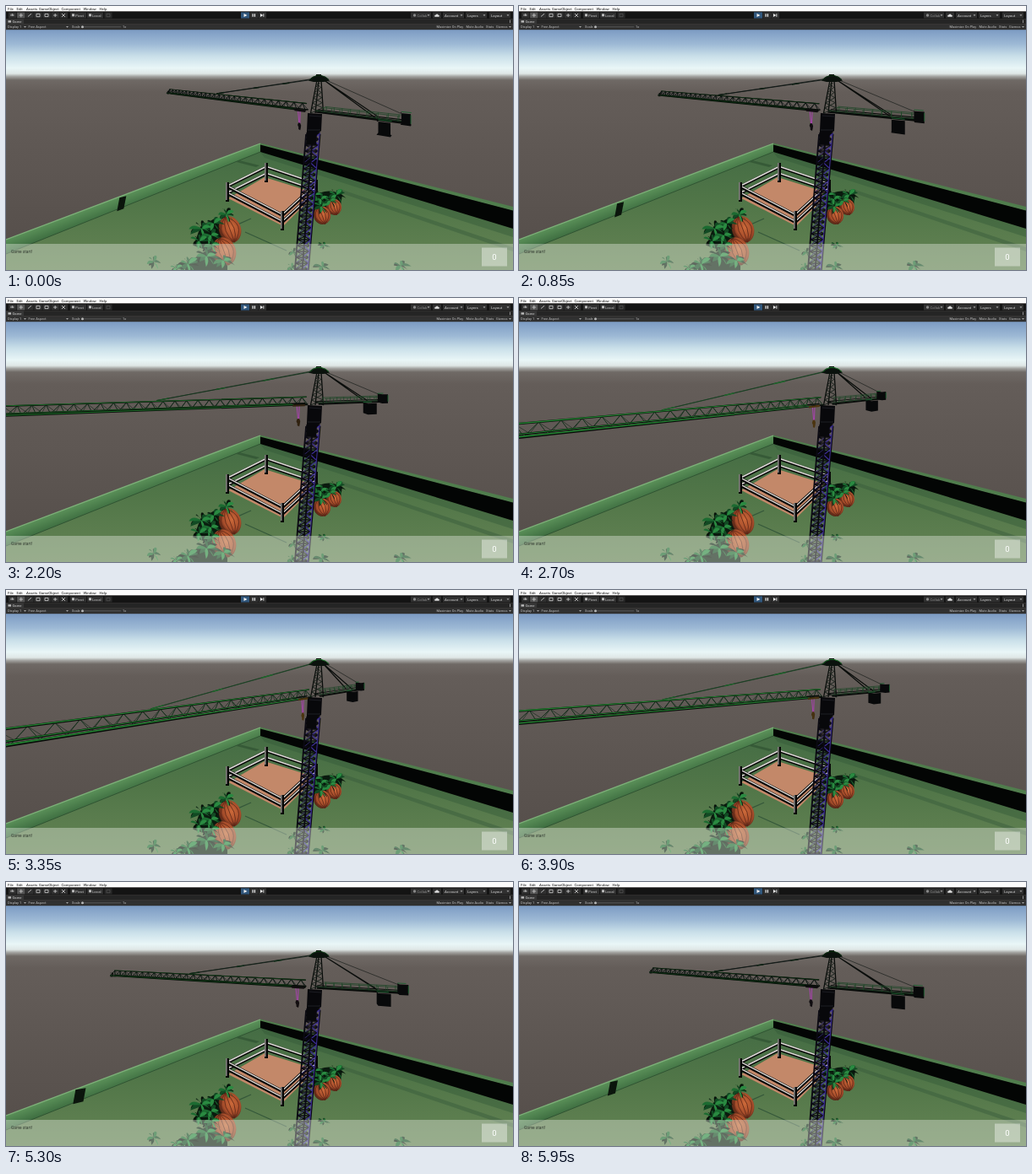
These frames come from a looping animation (600 px wide and 313 px high, 6 s). An HTML page:

```html
<!DOCTYPE html>
<html lang="en">
<head>
<meta charset="utf-8">
<title>Crane game</title>
<style>
html, body { margin: 0; width: 100%; height: 100%; overflow: hidden; background: #5a534f; }
svg { display: block; width: 100vw; height: 100vh; font-family: Roboto, "Liberation Sans", sans-serif; }
</style>
</head>
<body>
<svg id="stage" viewBox="0 0 600 313" preserveAspectRatio="none">
  <defs>
    <linearGradient id="sky" x1="0" y1="28" x2="0" y2="313" gradientUnits="userSpaceOnUse">
      <stop offset="0" stop-color="#7c9bc3"/>
      <stop offset=".06" stop-color="#9db9d5"/>
      <stop offset=".11" stop-color="#c9dfe9"/>
      <stop offset=".16" stop-color="#e9f6f7"/>
      <stop offset=".183" stop-color="#dfe7e6"/>
      <stop offset=".195" stop-color="#a3a3a0"/>
      <stop offset=".21" stop-color="#6f6965"/>
      <stop offset=".26" stop-color="#645d59"/>
      <stop offset="1" stop-color="#544d49"/>
    </linearGradient>
    <linearGradient id="grass" x1="0" y1="170" x2="0" y2="313" gradientUnits="userSpaceOnUse">
      <stop offset="0" stop-color="#446c44"/>
      <stop offset=".45" stop-color="#517648"/>
      <stop offset="1" stop-color="#648354"/>
    </linearGradient>
    <linearGradient id="wall" x1="150" y1="220" x2="156" y2="236" gradientUnits="userSpaceOnUse">
      <stop offset="0" stop-color="#5b9159"/>
      <stop offset="1" stop-color="#3c6b3f"/>
    </linearGradient>
    <radialGradient id="pumpkin" cx=".6" cy=".45" r=".65">
      <stop offset="0" stop-color="#cc6a3a"/>
      <stop offset=".6" stop-color="#a54c2a"/>
      <stop offset="1" stop-color="#3a1a10"/>
    </radialGradient>
  </defs>
  <rect y="28" width="600" height="285" fill="url(#sky)"/>
  <g id="yard"></g>
  <path id="wallShadow" fill="#0b150c"/>
  <g id="props"></g>
  <g id="tower"></g>
  <g id="crane"></g>
  <g id="ui"></g>
</svg>
<script>
const $ = id => document.getElementById(id);
const NS = 'http://www.w3.org/2000/svg';

function add(parent, tag, attrs, text) {
  const el = document.createElementNS(NS, tag);
  for (const k in attrs) el.setAttribute(k, attrs[k]);
  if (text) el.textContent = text;
  return $(parent).appendChild(el);
}
const fill = (parent, d, color, opacity = 1) => add(parent, 'path', { d, fill: color, opacity });
const line = (parent, d, color, width) =>
  add(parent, 'path', { d, fill: 'none', stroke: color, 'stroke-width': width });
const rect = (parent, x, y, width, height, color, opacity = 1) =>
  add(parent, 'rect', { x, y, width, height, fill: color, opacity });
const label = (x, y, text, color, size = 4.2) =>
  add('ui', 'text', { x, y, fill: color, 'font-size': size }, text);

let seed = 11;
const random = () => (seed = seed * 16807 % 2147483647) / 2147483647;

function drawYard() {
  fill('yard', 'M0 288L301 168L600 258V313H0Z', 'url(#grass)');
  fill('yard', 'M301 173L600 263V274L306 180Z', '#345a38', .45);
  fill('yard', 'M398 218L600 286V291L394 221Z', '#35593a', .45);
  fill('yard', 'M276 183L300 189L296 191L273 185Z', '#2b4d2f', .6);
  line('yard', 'M283 268L332 290M236 276L290 252', '#35583a', 1.3);
  fill('yard', 'M0 277L301 163V173L0 294Z', 'url(#wall)');
  line('yard', 'M0 277L301 163', '#7db079', 1.3);
  line('yard', 'M0 294L301 173', '#2d5130', .9);
  fill('yard', 'M301 163L600 242V264L301 173Z', '#030504');
  fill('yard', 'M301 162.5L600 238V242.5L301 164.5Z', '#507d4d');
}

function drawRing() {
  fill('props', 'M306 203L367 222L328 261L263 228Z', '#c38869');
  const posts = [[308, 186], [367, 206], [327, 243], [262, 209]];
  const rail = (a, b, front) => [5, 13].forEach(h => {
    const d = `M${a[0]} ${a[1] + h}L${b[0]} ${b[1] + h}`;
    line('props', d, '#060606', front ? 4 : 3.2);
    add('props', 'path', { d, stroke: '#dcd9d5', 'stroke-width': front ? 1.3 : 1.6, transform: 'translate(0 -.8)' });
  });
  const post = p => {
    rect('props', p[0] - 2, p[1], 4, 23, '#060606');
    rect('props', p[0] - 1.6, p[1], 1, 21, '#cfccc8');
  };
  rail(posts[0], posts[1]);
  rail(posts[3], posts[0]);
  post(posts[0]);
  rail(posts[3], posts[2], true);
  rail(posts[2], posts[1], true);
  posts.slice(1).forEach(post);
}

function pumpkin(x, y, rx, ry) {
  const transform = `rotate(-20 ${x} ${y})`;
  add('props', 'ellipse', { cx: x, cy: y, rx, ry, transform, fill: 'url(#pumpkin)' });
  for (const k of [-.8, -.4, 0, .4, .8]) {
    add('props', 'path', { d: `M${x} ${y - ry}Q${x + k * rx * 2} ${y} ${x} ${y + ry}`, transform,
      fill: 'none', stroke: '#5a2517', 'stroke-width': .7 });
  }
}

// A fan of curved leaves around one stem, dark below and bright on top.
function plant(x, y, size, leaves = 12) {
  const greens = ['#07120a', '#0c2413', '#124a23', '#1c6b31', '#2a8a41'];
  for (let i = 0; i < leaves; i++) {
    const a = i * 2.4 + random();
    const r = size * (.75 + random() * .45);
    const tx = x + Math.cos(a) * r, ty = y + Math.sin(a) * r * .75 + r * .1;
    const mx = (x + tx) / 2, my = (y + ty) / 2 - r * .25, b = size * .3;
    const shade = greens[Math.floor(i / leaves * greens.length)];
    fill('props', `M${x} ${y}Q${mx - b} ${my - b} ${tx} ${ty}Q${mx + b} ${my + b} ${x} ${y}Z`, shade);
  }
}

function drawGarden() {
  fill('props', 'M363 226Q380 214 398 224L396 236L364 246Z', '#0a1a0e');
  pumpkin(388, 238, 9, 10);
  pumpkin(374, 248, 10, 11);
  [[373, 229, 10], [391, 224, 11], [374, 238, 10], [366, 224, 8], [384, 231, 9]].forEach(p => plant(...p));
  fill('props', 'M230 262L250 250L256 276L240 290L222 284Z', '#0a1a0e');
  fill('props', 'M212 306L240 288L262 302V313H212Z', '#0e2212');
  pumpkin(265, 265, 13, 16);
  pumpkin(258, 291, 14, 17);
  [[261, 247, 11], [246, 258, 11], [232, 264, 13], [243, 272, 12], [229, 279, 11],
   [244, 284, 12], [258, 302, 12], [238, 297, 13], [216, 306, 13], [202, 311, 8]].forEach(p => plant(...p));
  [[175, 303, 10], [376, 284, 7], [340, 292, 7], [374, 309, 10], [467, 308, 11], [338, 310, 7]]
    .forEach(p => plant(...p, 9));
}

function drawTower() {
  const left = y => 354.5 - (y - 160) * .082;
  const right = y => 371 - (y - 160) * .086;
  const black = '#0b0a12', blue = '#3b2d92', step = 7;
  for (let y = 151, odd = 0; y < 313; y += step, odd ^= 1) {
    const l = left(y), r = right(y), l2 = left(y + step), r2 = right(y + step);
    const m = (l + r) / 2, m2 = (l2 + r2) / 2;
    line('tower', `M${l} ${y}L${r2} ${y + step}M${r} ${y}L${l2} ${y + step}M${l} ${y}H${r}`, black, 1.3);
    line('tower', odd ? `M${m} ${y}L${r2} ${y + step}` : `M${r} ${y}L${m2} ${y + step}`, blue, 1.3);
    line('tower', `M${m} ${y}L${l2} ${y + step}`, '#2c2464', 1);
  }
  line('tower', `M${left(152)} 152L${left(313)} 313M363 152L350.5 313`, black, 1.9);
  line('tower', `M${right(152)} 152L${right(313)} 313`, black, 1.7);
  line('tower', `M${right(152) - .8} 152L${right(313) - .8} 313`, blue, 1);
  fill('tower', 'M357 127L374 128L373 148L368 152L367 165L355 164L356 148Z', '#08080b');
  line('tower', 'M359 130L373 131M357 147H372', '#22242a', .8);
  line('tower', 'M368 88L360.5 127M373 88L375.5 127M370 89L366 127', '#080b09', 1.3);
  for (let y = 91, w = 3; y < 124; y += 6, w += 1.1) {
    line('tower', `M${370 - w} ${y}L${371 + w * .6} ${y + 6}M${370 + w * .5} ${y}L${369 - w} ${y + 6}`, '#141d17', .9);
  }
}

function drawUi() {
  rect('ui', 0, 282, 600, 31, '#e6ebe2', .4);
  rect('ui', 563, 286.5, 30, 22, '#ffffff', .38);
  label(6, 293, 'Game start!', '#30382f', 4.8);
  add('ui', 'text', { x: 578, y: 301, fill: '#fff', 'font-size': 9.5, 'text-anchor': 'middle' }, '0');

  rect('ui', 0, 0, 600, 6.5, '#fbfbfb');
  [[2, 'File'], [12.5, 'Edit'], [24, 'Assets'], [39, 'GameObject'], [65.5, 'Component'], [91.5, 'Window'], [110.5, 'Help']]
    .forEach(([x, s]) => label(x, 4.6, s, '#111', 4.3));
  rect('ui', 0, 6.5, 600, 8.8, '#141414');
  for (let i = 0; i < 7; i++) rect('ui', 3 + i * 10.1, 7.6, 9.4, 6.8, i === 1 ? '#555' : '#303030');
  line('ui', 'M6 12V9.5M7.4 12V9M8.8 12V9.6M17.8 8.7V13.3M15.5 11H20.1M26 12.5L30 9.2M36 9.3H40V12.7H36ZM46 9.4H50V12.6H46ZM56 11H60.5M58.2 9V13M66 13L70 9M66 9L70 13', '#cfcfcf', .8);
  rect('ui', 76, 7.6, 19, 6.8, '#303030');
  rect('ui', 96, 7.6, 19, 6.8, '#303030');
  rect('ui', 116.5, 7.6, 9, 6.8, '#282828');
  line('ui', 'M119 9.3H123V12.7H119Z', '#555', .7);
  rect('ui', 78, 9.3, 3, 3, '#bbb');
  rect('ui', 98, 9.3, 3, 3, '#bbb');
  label(82, 12.5, 'Pivot', '#c4c4c4', 4.4);
  label(102, 12.5, 'Local', '#c4c4c4', 4.4);
  rect('ui', 278, 7.4, 10, 7.2, '#31577c');
  rect('ui', 288.5, 7.4, 9.5, 7.2, '#303030');
  rect('ui', 298.5, 7.4, 9.5, 7.2, '#303030');
  fill('ui', 'M281.5 9L285.5 11L281.5 13ZM291.5 9.2H292.7V12.8H291.5ZM293.8 9.2H295V12.8H293.8ZM301 9L304.2 11L301 13ZM304.4 9.2H305.3V12.8H304.4Z', '#f0f0f0');
  [[479, 24], [505, 10], [517, 25], [544, 25], [572, 25]].forEach(([x, w]) => rect('ui', x, 7.6, w, 6.8, '#303030'));
  add('ui', 'circle', { cx: 483.5, cy: 11, r: 1.7, fill: '#888' });
  label(486.5, 12.5, 'Collab', '#858585');
  fill('ui', 'M507.5 12.7Q506.5 10.8 508.7 10.6Q510 8.5 511.5 10.4Q513.7 11 512.4 12.7Z', '#ddd');
  [[519, 'Account'], [546, 'Layers'], [574, 'Layout']].forEach(([x, s]) => label(x, 12.5, s, '#d0d0d0', 4.4));
  fill('ui', 'M498.5 10.3H501.5L500 12ZM537.5 10.3H540.5L539 12ZM564.5 10.3H567.5L566 12ZM592.5 10.3H595.5L594 12Z', '#aaa');

  rect('ui', 0, 15.3, 600, 6.2, '#252525');
  rect('ui', 0, 15.3, 21, 6.2, '#363636');
  rect('ui', 2.5, 17.2, 3.5, 2.4, '#bbb');
  label(7.5, 20.1, 'Game', '#d0d0d0');
  rect('ui', 596, 16.5, .8, 3.7, '#aaa');
  rect('ui', 0, 21.5, 600, 6.7, '#303030');
  [[2, 'Display 1'], [26.5, 'Free Aspect'], [78, 'Scale'], [138, '1x'], [509.5, 'Maximize On Play'],
   [544.5, 'Mute Audio'], [568, 'Stats'], [580, 'Gizmos']].forEach(([x, s]) => label(x, 26.2, s, '#bdbdbd', 4));
  fill('ui', 'M21 24H24L22.5 25.7ZM71 24H74L72.5 25.7ZM595 24H598L596.5 25.7Z', '#aaa');
  line('ui', 'M89 24.8H136', '#666', .7);
  add('ui', 'circle', { cx: 90.5, cy: 24.8, r: 1.5, fill: '#b5b5b5' });
}

// Slew angle keys: [seconds, degrees, degrees per second]
const KEYS = [[0, 38, -2], [.85, 30, -19], [1.7, 6.5, -32], [2.7, -25.5, -26], [3.27, -34, 0],
  [3.9, -22, 31], [4.75, 6, 28], [5.95, 27, 8], [6, 27.4, 8]];

function slewAt(t) {
  let i = 0;
  while (i < KEYS.length - 2 && t >= KEYS[i + 1][0]) i++;
  const [t0, a, va] = KEYS[i], [t1, b, vb] = KEYS[i + 1];
  const d = t1 - t0, u = (t - t0) / d, u2 = u * u, u3 = u2 * u;
  return a * (2 * u3 - 3 * u2 + 1) + b * (3 * u2 - 2 * u3) + d * (va * (u3 - 2 * u2 + u) + vb * (u3 - u2));
}

const layer = (color, stroke) => add('crane', 'path',
  stroke ? { fill: 'none', stroke: color, 'stroke-width': stroke } : { fill: color });

drawYard();
drawRing();
drawGarden();
drawTower();
drawUi();

const parts = {
  ties: layer('#0d140f', .8),
  tieBars: layer('#12301b', 1.4),
  backTies: layer('#0a0d0b', 1.2),
  thinTie: layer('#1a1f1c', .7),
  farBraces: layer('#0a150d', .6),
  braces: layer('#0a150d', 1),
  chords: layer('#080d09'),
  highlights: layer('#1d6a32'),
  deck: layer('#090c0a'),
  deckEdge: layer('#1c4526', .7),
  blocks: layer('#08090a'),
  blockEdge: layer('#1c6030', .9),
  rope: layer('#b040b8', .9),
  hook: layer('#100d0e'),
  cap: layer('#0b120d')
};
const capEdge = line('crane', 'M359.5 87.5Q363 83.5 368 82.5H373Q379 83.5 382 87.5', '#1d5a2f', 1);

function render(t) {
  const deg = slewAt(t), a = deg * Math.PI / 180, c = Math.cos(a), s = Math.sin(a);
  // Perspective of a point: reach along the jib, sideways offset, drop below eye level.
  const at = (reach, side, drop) => {
    const w = 1 + (reach * s + side * c) / 261;
    return `${(300 + (68 - reach * c + side * s) / w).toFixed(2)} ${(75 + drop / w).toFixed(2)}`;
  };
  const poly = pts => 'M' + pts.map(p => at(...p)).join('L') + 'Z';
  const beam = (r0, r1, side, drop, h) =>
    poly([[r0, side, drop], [r1, side, drop], [r1, side, drop + h], [r0, side, drop + h]]);
  const seg = (p, q) => `M${at(...p)}L${at(...q)}`;
  const box = (r0, r1, side, d0, d1) =>
    [-side, side].map(v => beam(r0, r1, v, d0, d1 - d0)).join('') +
    [r0, r1].map(r => poly([[r, -side, d0], [r, side, d0], [r, side, d1], [r, -side, d1]])).join('') +
    poly([[r0, -side, d0], [r1, -side, d0], [r1, side, d0], [r0, side, d0]]);
  const set = (name, d) => parts[name].setAttribute('d', d);

  const TIP = 330, ROOT = 13, PANELS = 27, step = (TIP - ROOT) / PANELS;
  let near = '', far = '';
  for (let i = 0; i < PANELS; i++) {
    const r = ROOT + i * step, m = r + step / 2, e = r + step;
    near += seg([r, -3.5, 50], [m, 0, 42]) + seg([m, 0, 42], [e, -3.5, 50]);
    far += seg([r, 3.5, 50], [m, 0, 42]) + seg([m, 0, 42], [e, 3.5, 50]) + seg([r, -3.5, 50], [r, 3.5, 50]);
  }
  set('braces', near);
  set('farBraces', far);
  set('chords', beam(ROOT, TIP - 5, 0, 41.2, 1.4) + beam(ROOT, TIP, -3.5, 49.2, 1.9) + beam(ROOT, TIP, 3.5, 49.2, 1.4) +
    box(TIP - 4, TIP + 2, 3.5, 46, 52));
  set('highlights', beam(ROOT, TIP - 5, 0, 41.3, .8) + beam(30, TIP, -3.5, 49.4, .9) + beam(30, TIP, 3.5, 49.4, .6));

  const [tx, ty] = at(178, 0, 41).split(' ').map(Number);
  const along = u => `${364 + (tx - 364) * u} ${87 + (ty - 87) * u}`;
  set('ties', `M364 87L${tx} ${ty}M366 86L${tx} ${ty}`);
  set('tieBars', `M${along(.25)}L${along(.32)}M${along(.56)}L${along(.62)}M${along(.92)}L${along(1)}`);
  set('backTies', `M375 87L${at(-63, -5, 48)}M375 87L${at(-63, 5, 48)}`);
  set('thinTie', `M379 88L${at(-84, 0, 42)}`);

  set('deck', beam(0, -88, -4, 48, 3) + beam(0, -88, 4, 48, 2.6) +
    poly([[0, -4, 49], [-88, -4, 49], [-88, 4, 49], [0, 4, 49]]));
  let rails = '';
  for (let r = -10; r > -84; r -= 9) rails += seg([r, 4, 44], [r, 4, 49]) + seg([r, -4, 44], [r, -4, 49]);
  set('deckEdge', rails + seg([-8, 4, 44], [-84, 4, 44]) + seg([-8, -4, 44], [-84, -4, 44]) + seg([0, -4, 48.5], [-88, -4, 48.5]));
  set('blocks', box(-76, -64, 4.5, 51.5, 65) + box(-92, -84, 4, 41, 52));
  set('blockEdge', seg([-92, 4, 41], [-84, 4, 41]) + seg([-92, -4, 42], [-92, -4, 50]) + seg([-76, 4.5, 51.5], [-64, 4.5, 51.5]));

  set('rope', seg([22, 0, 52], [22.5, 0, 69]) + seg([25, 0, 52], [23.5, 0, 68]));
  set('hook', beam(15, 30, 0, 50.5, 2.2) +
    poly([[22, 0, 67], [24.5, 0, 67], [25.6, 0, 70], [24.4, 0, 72.5], [24.4, 0, 75], [22, 0, 76], [21.3, 0, 73.5], [20.8, 0, 70]]));
  set('cap', 'M358 88.5Q361 84 367 82.5V81H373V82.5Q380 84 383 88.5L376 90H364Z');

  // Members facing the light turn greener as the jib swings towards the viewer.
  const lit = Math.max(0, Math.min(1, (30 - deg) / 55));
  const green = (k, base) => `rgb(${10 + 26 * lit * k},${base + 90 * lit * k},${16 + 34 * lit * k})`;
  parts.braces.setAttribute('stroke', green(.35, 18));
  parts.farBraces.setAttribute('stroke', green(.25, 16));
  parts.highlights.setAttribute('fill', green(.9, 45));
  parts.tieBars.setAttribute('stroke', green(.8, 28));
  parts.ties.setAttribute('stroke', green(.5, 18));
  capEdge.setAttribute('stroke', green(.8, 45));
  parts.hook.setAttribute('fill', `rgb(${16 + 60 * lit * lit},${13 + 40 * lit * lit},16)`);

  const x = 20 + 4.05 * deg - .026 * deg * deg;
  const top = 277 - x * .379, bottom = 294 - x * .402, half = 4 + Math.max(0, 30 - deg) * .18;
  $('wallShadow').setAttribute('d', `M${x - half + 2} ${top + 2}L${x + half + 2} ${top}` +
    `L${x + half - 1} ${bottom + 1}L${x - half - 1} ${bottom + 4}Z`);
}

const LOOP = 6000, TICK = 50;
const start = performance.now();
function frame() {
  const ms = (performance.now() - start) % LOOP;
  render(Math.floor(ms / TICK) * TICK / 1000);
  requestAnimationFrame(frame);
}
frame();
</script>
</body>
</html>
```
